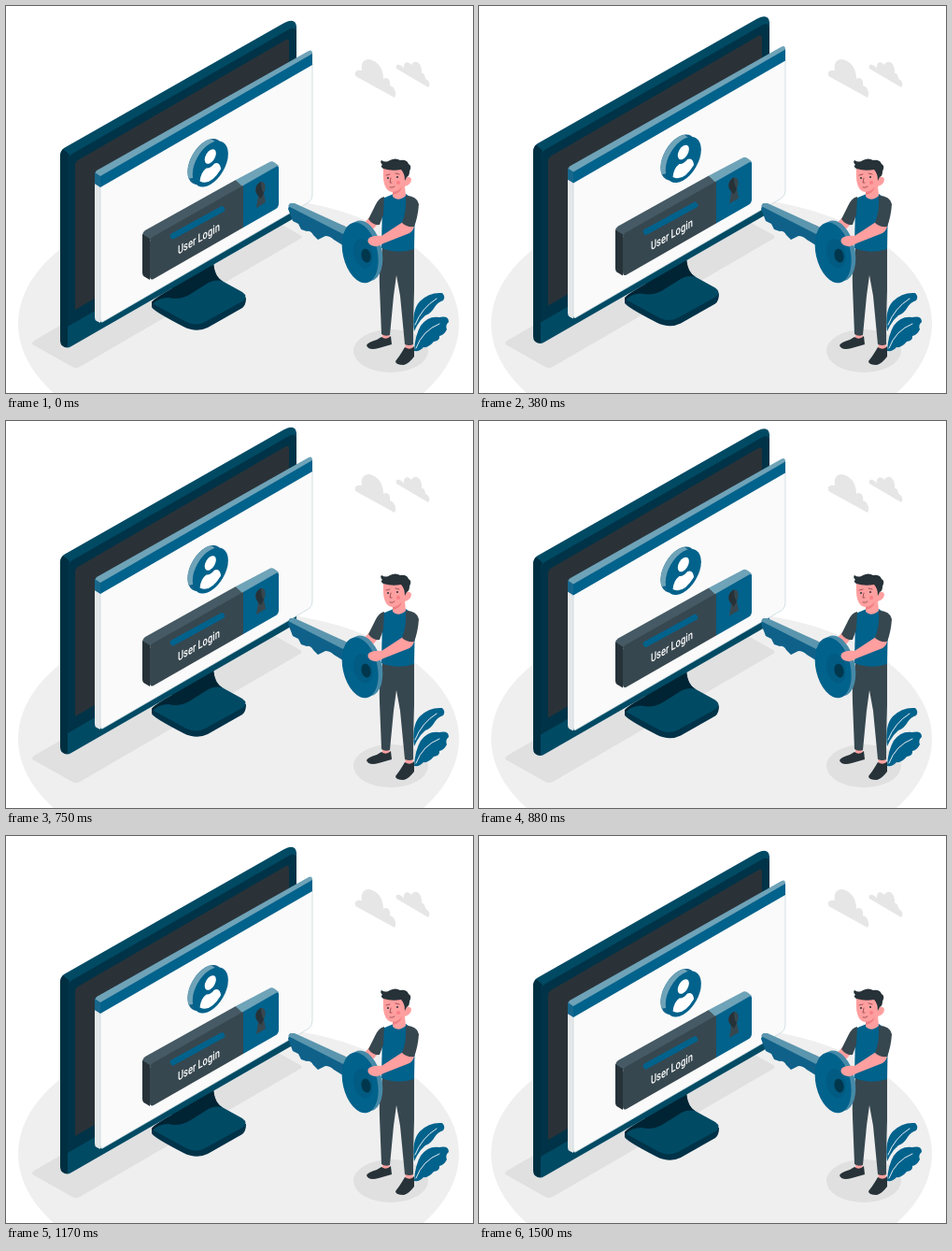
An HTML page that plays this animation: 500x414 px, repeating every 1.54 s.

```html
<!DOCTYPE html>
<html lang="en">
<head>
<meta charset="utf-8">
<title>User Login</title>
<style>
  html, body { margin: 0; width: 100%; height: 100%; overflow: hidden; background: #fff; }
  svg { display: block; width: 500px; height: 414px; }
  .blue { fill: #01628c; }
  .light { fill: #6fa3b8; }
  .navy { fill: #004a64; }
  .slate { fill: #37474f; }
  .dark { fill: #263238; }
  .skin { fill: #ff9f9f; }
  .grey { fill: #e0e0e0; }
  .cloud { fill: #e6e6e6; }
  .line { fill: none; stroke-linecap: round; }
  text { font: 500 13px Roboto, sans-serif; fill: #fff; }
</style>
</head>
<body>
<svg viewBox="0 0 500 414">
  <!-- Floor and clouds -->
  <ellipse cx="249" cy="340" rx="236" ry="136" fill="#efefef"/>
  <path class="grey" d="M30 358 L270 220 L315 245 Q318 247 315 249 L79 386 Q75 388 71 386 L30 363 Q26 361 30 358Z"/>
  <path class="cloud" d="M376 76 C372 74 373 67 381 69 C379 59 386 55 392 58 C400 61 404 69 404 78 C409 75 412 80 411 85 C416 86 419 94 416 98Z"/>
  <path class="cloud" d="M418 67 C416 62 422 61 426 67 C425 60 430 58 434 63 C438 56 446 61 445 72 C449 71 448 78 451 79 C454 81 454 86 452 87Z"/>

  <g id="computer">
    <!-- Stand -->
    <path d="M156 317 V322 Q157 326 190 343 Q204 350 216 344 L253 323 Q257 320 257 312Z" fill="#003248"/>
    <path class="navy" d="M158 315 L178 302 L222 276 Q223 290 233 295 L253 306 Q260 311 253 316 L213 338 Q204 343 193 338 L160 320 Q154 317 158 315Z"/>
    <path d="M156 317 Q158 313 178 302 V295 L222 270 Q222 288 231 294 Q222 292 212 299 L196 309 Q185 315 174 312 Q163 312 157 319Z" fill="#002434"/>

    <!-- Monitor -->
    <path class="navy" d="M58 161 Q58 155 62 152 L298 18 Q310 12 311 22 V220 Q311 226 305 229 L70 364 Q64 368 59 362Z"/>
    <path d="M66 166 Q66 161 71 158 L303 25 Q311 21 311 29 V202 L66 343Z" fill="#003347"/>
    <path d="M58 161 Q58 156 61 153 L68 159 Q66 162 66 166 V365 Q58 365 58 358Z" fill="#002f41"/>
    <path fill="#2a3238" d="M74 170 Q74 167 77 165 L300 36 Q303 35 303 38 V192 L74 325Z"/>

    <!-- Window -->
    <path d="M95 190 L101 193 V339 L97 337 Q95 336 95 333Z" fill="#e4e7e8"/>
    <path d="M101 193 L328 62 V202 Q328 207 324 210 L105 337 Q101 340 101 335Z" fill="#fafafa" stroke="#c8dadd" stroke-width=".8"/>
    <path class="light" d="M95 179 L97 176 L324 48 Q328 46 328 51 V54 L101 183Z"/>
    <path class="blue" d="M101 182 L328 51 V63 L101 194Z"/>
    <path d="M95 178 L101 182 V194 L95 190Z" fill="#17678d"/>

    <!-- Profile badge -->
    <g transform="matrix(.866 -.5 0 1 213.500 166.500)">
      <circle r="22" fill="#12628a"/>
      <path class="light" d="M-20.500 8 A22 22 0 0 1 7 -20.900 L14 -13 L-8 12Z"/>
    </g>
    <g transform="matrix(.866 -.5 0 1 218.800 169)">
      <circle class="blue" r="22"/>
      <circle cy="-8" r="7" fill="#fff"/>
      <path d="M-13 12 Q-12 3 -5 2 Q0 5 5 2 Q12 3 13 12 Q0 24 -13 12Z" fill="#fff"/>
    </g>

    <!-- Login box -->
    <path d="M146 245 Q146 242 149 240 L246 186 L254 193 L155 251Z" fill="#455a64"/>
    <path class="light" d="M246 186 L283 166.500 Q286 165 292 171 L254 194Z"/>
    <path class="dark" d="M146 244 L154 249 V293 L149 290 Q146 289 146 285Z"/>
    <path class="slate" d="M154 252 Q154 249 157 247 L254 192 V237 L158 292 Q154 294 154 289Z"/>
    <path class="blue" d="M254 192 L289 172 Q292 170 292 173 V211 Q292 215 289 217 L254 237Z"/>
    <path class="line" d="M179 246 L231 217.500" stroke="#01628c" stroke-width="6.500"/>
    <text transform="matrix(.72 -.416 0 1 184 266)">User Login</text>
    <path class="slate" d="M268 200 C266 194 269 190 273 188 C278 187 279 195 276 200 L278 210 L268 216 L270 203Z"/>
    <path class="dark" d="M268 200 C266 194 269 190 273 188 Q273 197 276 200 L273 206 L270 203Z"/>
  </g>

  <!-- Plant -->
  <ellipse class="grey" cx="412" cy="369" rx="40" ry="23"/>
  <path class="blue" d="M437 348 Q434 326 443 316 Q453 306 467 307 Q471 311 468 315 Q462 317 459 322 Q455 329 449 331 Q444 335 440 342Z"/>
  <path class="blue" d="M437 369 Q438 352 444 342 Q452 331 464 333 Q474 331 474 338 Q470 341 472 346 Q469 352 464 353 Q465 358 458 359 Q452 366 447 365 Q443 370 437 369Z"/>
  <path class="line" d="M438 341 Q445 323 461 313 M439 366 Q446 347 464 340" stroke="#fff" stroke-width=".9"/>

  <!-- Legs -->
  <path class="skin" d="M403 349 H411 L410 358 H403Z M428 360 H436 L435 370 H427Z"/>
  <path class="dark" d="M386 363 Q387 360 397 357 L402 354 Q407 358 412 353 L413 362 Q406 364 399 366 Q388 369 386 363Z"/>
  <path class="dark" d="M417 380 Q421 375 424 370 L427 365 Q433 369 437 364 L437 375 Q432 382 426 384 Q417 384 417 380Z"/>
  <path class="slate" d="M403 259 Q399 280 400 301 L402 351 Q406 354 411 352 L415 310 L418 288 L422 310 L427 362 Q432 364 436 362 Q436 335 437 304 L437 259Z"/>

  <!-- Far arm -->
  <path class="skin" d="M351 236 Q355 232 362 235 L366 240 L358 240Z M389 226 L399 232 L392 240 L384 241 L381 235Z"/>

  <!-- Key -->
  <path d="M303 214 L364 242 V258 L351 250 Q347 246 342 246 L334 250 L329 245 Q326 240 322 241 L316 239 L313 233 L307 230 L302 217Z" fill="#0f6189"/>
  <path d="M302 214 L304 211 L309 211 L366 237 L361 244Z" fill="#5b96ae"/>
  <g transform="rotate(-13 381 263)">
    <ellipse cx="384" cy="262.500" rx="18.500" ry="33" fill="#468aa8"/>
    <ellipse class="blue" cx="379" cy="263.500" rx="18.500" ry="33"/>
    <ellipse cx="382" cy="265" rx="10" ry="16" fill="#015b82"/>
    <ellipse cx="384.500" cy="268" rx="5" ry="7.500" fill="#00374d"/>
  </g>

  <!-- Upper body -->
  <path class="blue" d="M403 206 L415 201 H428 L438 208 L437 260 Q420 266 402 259Z"/>
  <path class="slate" d="M405 204 Q399 205 395 214 L388 228 Q393 235 400 234 L404 223Z"/>
  <path class="skin" d="M425 231 L437 234 Q437 240 432 243 L404 254 Q398 259 391 256 Q386 253 388 249 Q392 245 402 246Z"/>
  <path class="slate" d="M428 203 Q440 203 442 212 Q441 226 437 236 Q429 237 424 232 Q429 220 428 203Z"/>

  <!-- Head -->
  <path class="skin" d="M404 173 Q403 189 407 195 Q410 199 414 199 L414 204 Q420 210 428 203 L427 193 Q434 191 434 185 Q432 181 427 184 L425 172Z"/>
  <path d="M414 199 Q421 198 424 193 Q422 201 414 202Z" fill="#ee7f83"/>
  <path class="dark" d="M404 174 Q400 171 403 170 Q400 167 402 165 Q407 168 411 165 Q417 162 422 165 Q429 164 431 169 Q435 171 432 177 Q432 182 429 183 L427 187 Q427 179 423 175 Q413 177 404 174Z"/>
  <path class="line" d="M407 181 L411 180 M417 179 L421 180 M412 184 L411 189 L413 189 M411 194 Q414 195 416 193" stroke="#8b4148" stroke-width=".8"/>
  <circle class="dark" cx="409" cy="184" r="1"/>
  <circle class="dark" cx="419" cy="183" r="1"/>
  <circle cx="420" cy="189" r="2" fill="#fa7f86"/>
</svg>
<script>
  const LOOP = 1540, STEP = 1000 / 24, HALF = 18, LIFT = 9;
  const computer = document.getElementById("computer");

  // Linear rise and fall at 24 steps per second, resting briefly at the bottom.
  function draw(now) {
    const step = Math.floor((now % LOOP + 4) / STEP);
    const rise = Math.max(0, 1 - Math.abs(step - HALF) / HALF);
    computer.setAttribute("transform", `translate(0 ${-LIFT * rise})`);
    requestAnimationFrame(draw);
  }
  draw(0);
</script>
</body>
</html>
```
